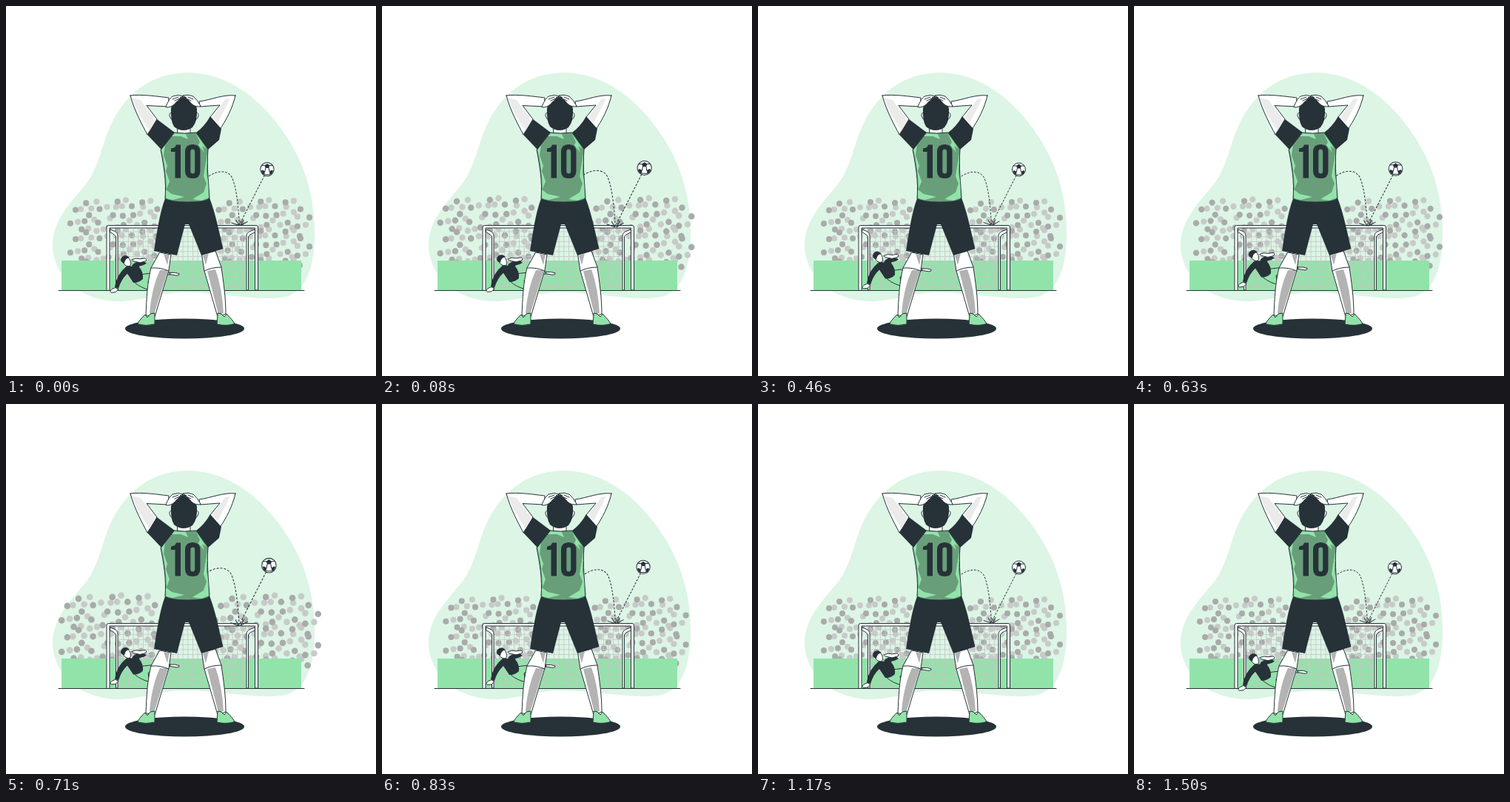
These frames come from a looping animation (500x500 px, 1540 ms). An HTML page:

```html
<!DOCTYPE html>
<html lang="en">
<head>
<meta charset="utf-8">
<title>Missed shot</title>
<style>
html, body { margin: 0; width: 100%; height: 100%; overflow: hidden; background: #fff; }
svg { display: block; width: 100vw; height: 100vh; }
.ink { fill: #263238; }
.skin { fill: #fff; stroke: #263238; stroke-width: 1; stroke-linejoin: round; stroke-linecap: round; }
.line { fill: none; stroke: #263238; stroke-width: 1; stroke-linecap: round; stroke-linejoin: round; }
.green { fill: #92e3a9; }
.shade { fill: #b3b3b3; }
</style>
</head>
<body>
<svg viewBox="0 0 500 500">
  <path fill="#dcf5e5" d="M247 90C300 91 345 125 378 175C405 215 417 260 417 305C417 350 408 384 378 393C345 400 290 387 240 387C205 388 185 399 150 399C100 398 63 365 63 322C64 285 92 262 110 238C130 210 130 175 152 142C173 110 205 90 247 90Z"/>
  <g id="crowd"></g>
  <rect class="green" x="75" y="344" width="324" height="40.5"/>

  <path id="net" fill="none" stroke="#c4c6c5" stroke-width=".8"/>
  <g class="skin">
    <path d="M141 302L146 304Q151 306 151 311V384H148.500V312Q148 309 141 306Z"/>
    <path d="M336 302L331 304Q325 306 325 311V384H327.500V312Q328 309 336 306Z"/>
    <path d="M136 384V299Q136 296.500 138.500 296.500H338Q340.500 296.500 340.500 299V384H336.500V300H140V384Z"/>
  </g>
  <path class="line" d="M71 384.500H403"/>

  <g id="keeper">
    <path class="green" stroke="#263238" d="M183 363C195 361 206 361 223 360.500L223 363C210 364 199 366 192 372L194 384C186 382 178 378 173 373Z"/>
    <path class="skin" d="M222 360.500Q229 360 234 362Q235 364 231 364.500L222 363Z"/>
    <path class="ink" d="M164 351L170 352L178 346L182 347L180 353Q186 360 185 369Q179 375 172 374L164 362Q156 369 152 382L147 380Q149 363 164 351Z"/>
    <path class="ink" d="M170 351Q176 344 187 346L190 348Q184 352 177 352Z"/>
    <path class="skin" d="M170 343Q176 340 181 342L188 341Q191 342 189 345L181 347L172 345Z"/>
    <path class="skin" d="M148 381L152 383L148 387L142 387.500Q139.500 386 143 383Z"/>
    <path class="skin" d="M159 341Q167 338 168 345Q170 351 166 352Q160 352 158 346Z"/>
    <path class="ink" d="M155 343Q156 337 163 337.500L167 340Q161 341 160 348Q155 347 155 343Z"/>
  </g>

  <g id="flight">
    <path class="line" stroke-dasharray="2 2.600" d="M275 230C287 222 301 222 306 233C312 248 314 272 315.500 295L349 229"/>
    <path class="line" d="M305 292.500L315 296L311 289M326 291L317 296L321 288.500"/>
    <circle class="skin" cx="352.500" cy="221" r="9"/>
    <g class="ink">
      <path d="M352.500 213.500L356 216L354.700 219.500H350.300L349 216Z"/>
      <path d="M346 222L349.500 224L349 228L346.500 227.500L344.500 223.500Z"/>
      <path d="M359 222L355.500 224L356 228L358.500 227.500L360.500 223.500Z"/>
    </g>
    <path class="line" stroke-width=".6" d="M350.300 219.500L349.500 224M354.700 219.500L355.500 224M349 228H356M349 216L345 216M356 216L360 216"/>
  </g>

  <ellipse class="ink" cx="241.500" cy="436" rx="80.500" ry="13.500"/>

  <path class="skin" d="M208 333L223 336L220 357L201 420L189 418C190 394 191 374 196 354Z"/>
  <path class="shade" d="M208 357L219 357L200 417L194 415Q197 380 208 357Z"/>
  <path class="shade" d="M213 335L221 336L218 350Z"/>
  <path class="line" d="M196 354Q208 353 220 358"/>
  <path class="skin" d="M265 336L283 331L291 353C294 374 297 394 297 416L286 420L268 358Z"/>
  <path class="shade" d="M272 358L283 356Q292 381 294 415L287 417Z"/>
  <path class="shade" d="M266 337L274 334L270 350Z"/>
  <path class="line" d="M268 358Q278 353 291 353"/>
  <path class="green" stroke="#263238" d="M188 417L191 421L195 416L201 415L201 430Q189 433 178 430Q179 425 188 417Z"/>
  <path class="green" stroke="#263238" d="M298 416L295 420L291 416L286 415L285 430Q297 433 309 429.500Q307 425 298 416Z"/>

  <path class="ink" d="M215 260Q245 266 275 259C284 283 288 306 293.500 328L264 337L247 295H242L231 337L200 331C204 306 207 282 215 260Z"/>

  <path class="skin" d="M168 121C184 119 203 122 220 124L219 136L190 134.500L204 153L191 174C184 160 174 143 168 121Z"/>
  <path fill="#ebebeb" d="M170 124L182 127L202 155L194 169Q179 147 170 124Z"/>
  <path class="skin" d="M310 121C294 119 277 127 261 129L262 136L289 134L276 150L288 168C298 154 306 138 310 121Z"/>
  <path fill="#ebebeb" d="M296 126L303 125L286 158L279 150Z"/>

  <path class="skin" d="M232 160H249V174H232Z"/>
  <path class="skin" d="M224 144Q219 144 222 151Q224 155 226 154ZM257 144Q262 144 259 151Q257 155 255 154Z"/>
  <path class="ink" d="M223 138Q226 123 240 123Q255 123 258 139Q259 156 252 164Q246 168 240 168Q233 168 227 163Q222 155 223 138Z"/>
  <path class="skin" d="M216 136Q220 126 225 122Q233 119 240 122L235 124Q240 124 238 127L231 129Q226 136 219 137Z"/>
  <path class="skin" d="M263 135Q258 126 253 122Q246 119 239 121L244 124Q238 124 241 128L248 129Q253 136 260 136Z"/>
  <path class="line" d="M225 126L233 123M228 128L236 124.500M253 126L246 123M250 128L242 124.500"/>
  <path class="ink" d="M232 128Q236 123 240 124Q245 124 249 130Z"/>

  <path fill="#689f7a" stroke="#263238" d="M226 171Q241 173 257 171L273 193C271 218 274 242 275 259Q273 265 245 265Q222 265 215 260C217 236 213 215 209 194Z"/>
  <g class="green">
    <path d="M227 172L243 173L246 180L236 176L224 176Z"/>
    <path d="M210 194L215 188L213 202L218 216L216 223L221 237L217 247Q216 218 210 194Z"/>
    <path d="M216 248L224 254L241 258L225 262L216 260Z"/>
    <path d="M257 173L271 193L265 189L268 198L260 188L262 184Z"/>
    <path d="M272 198L271 225L273 237L274 259L264 263L252 261L267 252L271 240L267 230Z"/>
  </g>
  <path class="ink" d="M204 153L228 171L210 194L191 174Z"/>
  <path class="ink" d="M276 149L291 166L288 181L273 194L257 171Q268 163 276 149Z"/>
  <g class="ink">
    <path d="M230 187.500H236V232.500H228.500V197H223V192.500Q229 192 230 187.500Z"/>
    <path fill-rule="evenodd" d="M242 197Q242 187 252.200 187Q262.500 187 262.500 197V223Q262.500 233 252.200 233Q242 233 242 223ZM249.300 197V223Q249.300 226.500 252.200 226.500Q255.200 226.500 255.200 223V197Q255.200 193.500 252.200 193.500Q249.300 193.500 249.300 197Z"/>
  </g>
</svg>
<script>
const LOOP = 1540;
const $ = id => document.getElementById(id);

// One patch of spectators, repeated in two columns and three rows.
const light = [124,265, 103,275, 117,274, 99,292, 121,289, 113,301, 138,272, 163,263, 150,272,
  142,287, 158,271, 168,290, 186,272, 196,264, 196,279, 178,296, 194,300, 182,281, 133,302,
  152,299, 201,285, 212,296];
const dark = [96,276, 110,267, 89,294, 108,291, 104,302, 114,283, 128,275, 126,293, 146,283,
  152,265, 159,284, 171,271, 173,283, 188,293, 185,266, 205,275, 201,298, 217,286, 140,300,
  160,296, 204,311];

function addFans(pts, color) {
  let d = "";
  for (const dx of [0, 191]) for (const dy of [0, 39, 78])
    for (let i = 0; i < pts.length; i += 2) {
      const x = pts[i] + dx, y = pts[i + 1] + dy;
      if (y < 352) d += `M${x - 4} ${y}a4 4 0 1 0 8 0a4 4 0 1 0 -8 0`;
    }
  $("crowd").insertAdjacentHTML("beforeend", `<path fill="${color}" d="${d}"/>`);
}
addFans(light, "#c8cac9");
addFans(dark, "#a9aaaa");

let mesh = "";
for (let x = 152; x < 326; x += 6.7) mesh += `M${x} 301V384`;
for (let y = 305; y < 384; y += 6.7) mesh += `M151 ${y}H325`;
$("net").setAttribute("d", mesh);

// Two beats, then a rest: [time, strength]
const beat = [[-20, 0], [135, 1], [420, 0], [584, 0], [730, 1], [850, 0], [LOOP, 0]];

function strength(t) {
  const i = beat.findIndex(k => k[0] >= t);
  if (i < 1) return 0;
  const [t0, a] = beat[i - 1], [t1, b] = beat[i];
  return a + (b - a) * (t - t0) / (t1 - t0);
}

function zoom(id, cx, cy, s) {
  $(id).setAttribute("transform", `translate(${cx} ${cy}) scale(${s}) translate(${-cx} ${-cy})`);
}

function draw(now) {
  const t = (now + 20) % LOOP - 20;
  const s = 1 + 0.1 * strength(t);
  zoom("crowd", 248.5, 312, s);
  zoom("flight", 319, 254, s);
  const u = (t + 20) / LOOP;
  $("keeper").setAttribute("transform", `translate(0 ${-9 * (1 - Math.abs(1 - 2 * u))})`);
}

let start;
function tick(now) {
  start ??= now;
  draw(now - start);
  requestAnimationFrame(tick);
}
draw(0);
requestAnimationFrame(tick);
</script>
</body>
</html>
```
